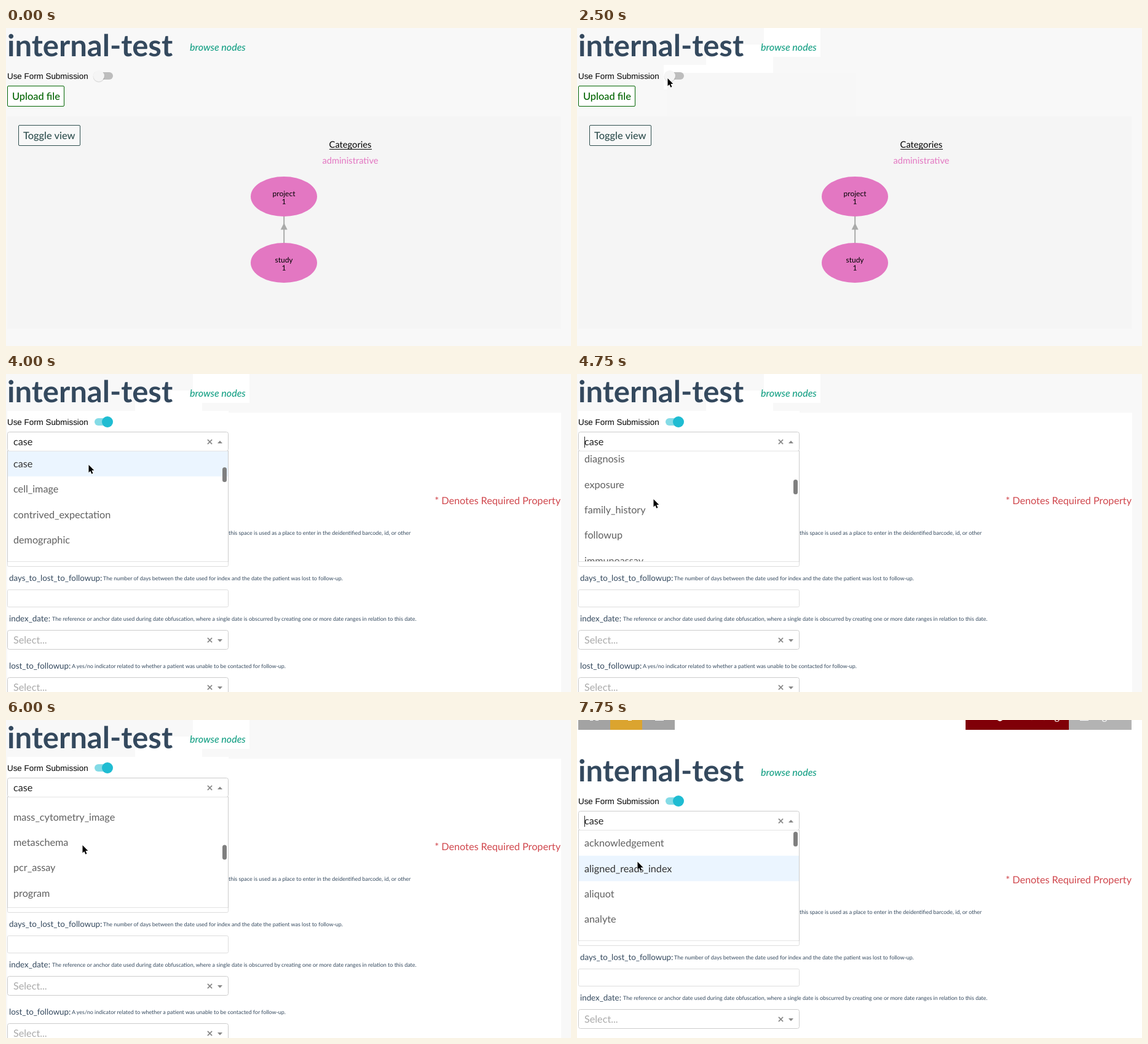
Write an HTML page that moves like this. It is 919 px wide and 518 px high and loops after 8000 ms.

```html
<!DOCTYPE html>
<html lang="en">
<head>
<meta charset="utf-8">
<title>internal-test</title>
<style>
@property --scroll { syntax: "<number>"; inherits: true; initial-value: 0; }
html, body { margin: 0; width: 100%; height: 100%; overflow: hidden; background: #f8f8f8; }
svg { display: block; width: 919px; height: 518px; font: 16.2px Lato, sans-serif; text-rendering: geometricPrecision; }
.title { font-size: 49px; font-weight: 700; fill: #34495e; }
.link { font-size: 16px; font-style: italic; font-weight: 500; fill: #16a085; }
.sans { font: 13.4px "Liberation Sans", Arial, sans-serif; }
.button { font-size: 16.4px; font-weight: 500; }
.node { font-size: 12px; text-anchor: middle; }
.legend { font-size: 14.7px; text-anchor: middle; }
.label { font-size: 13.35px; fill: #34495e; }
.hint { font-size: 8.95px; fill: #34495e; }
.box { fill: #fff; stroke: #ccc; }
.input { fill: #fff; stroke: #ddd; }
.muted { fill: #aaa; }
.option { fill: #606060; }
.lit rect { fill: #ebf5ff; }
.lit text { fill: #333; }
.required { fill: #d0474d; text-anchor: end; }

/* every change is a hard step on a 250 ms grid (3.125%) */
.anim { animation: 8s step-end infinite; }
.trail1 { animation-name: trail1; }
.trail2 { animation-name: trail2; }
.trail3 { animation-name: trail3; }
.press { animation-name: press; }
.form { animation-name: form; }
.graph { animation-name: graph; }
.ripple { animation-name: ripple; }
.menu { animation-name: menu, scroll; }
.rows { transform: translateY(calc(var(--scroll) * -1px)); }
.thumb { transform: translateY(calc(var(--scroll) * .116px)); }
.caret { animation-name: caret; animation-duration: 1s; }
.lit-case { animation-name: lit-case; }
.lit-index { animation-name: lit-index; }
.blank { animation-name: blank; }
.page { animation-name: page; }
.cursor { animation-name: cursor; }

@keyframes trail1 { 0% { opacity: 0 } 9.375%, to { opacity: 1 } }
@keyframes trail2 { 0% { opacity: 0 } 12.5%, to { opacity: 1 } }
@keyframes trail3 { 0% { opacity: 0 } 15.625%, to { opacity: 1 } }
@keyframes press { 0% { opacity: 0 } 31.25%, to { opacity: 1 } }
@keyframes form { 0% { opacity: 0 } 34.375%, to { opacity: 1 } }
@keyframes graph { 0% { opacity: 1 } 34.375%, to { opacity: 0 } }
@keyframes ripple { 0% { opacity: 0 } 34.375% { opacity: .25 } 40.625% { opacity: .12 } 46.875%, to { opacity: 0 } }
@keyframes menu { 0% { opacity: 0 } 46.875%, to { opacity: 1 } }
@keyframes caret { 0% { opacity: 0 } 50%, to { opacity: 1 } }
@keyframes lit-case { 0% { opacity: 0 } 46.875% { opacity: 1 } 56.25%, to { opacity: 0 } }
@keyframes lit-index { 0% { opacity: 0 } 93.75%, to { opacity: 1 } }
@keyframes blank { 0% { opacity: 0 } 90.625%, to { opacity: 1 } }
@keyframes page {
  0% { transform: none }
  90.625% { transform: translateY(18px) }
  93.75% { transform: translateY(46px) }
  96.875%, to { transform: translateY(54px) }
}
@keyframes scroll {
  0% { --scroll: 207 }
  56.25% { --scroll: 290 }
  59.375% { --scroll: 380 }
  62.5% { --scroll: 450 }
  65.625% { --scroll: 520 }
  68.75% { --scroll: 580 }
  71.875% { --scroll: 625 }
  75% { --scroll: 650 }
  78.125% { --scroll: 590 }
  81.25% { --scroll: 440 }
  84.375% { --scroll: 275 }
  87.5% { --scroll: 130 }
  90.625%, to { --scroll: 0 }
}
@keyframes cursor {
  0% { transform: translate(-40px, -40px) }
  6.25% { transform: translate(385px, 0) }
  9.375% { transform: translate(305px, 29px) }
  12.5% { transform: translate(210px, 56px) }
  15.625% { transform: translate(149px, 79px) }
  18.75% { transform: translate(147px, 81px) }
  40.625% { transform: translate(148px, 92px) }
  43.75% { transform: translate(144px, 108px) }
  46.875% { transform: translate(138px, 120px) }
  50% { transform: translate(134px, 147px) }
  53.125% { transform: translate(128px, 180px) }
  56.25% { transform: translate(124px, 203px) }
  93.75% { transform: translate(112px, 218px) }
  96.875%, to { transform: translate(98px, 230px) }
}
</style>
</head>
<body>
<svg viewBox="0 0 919 518">
  <defs>
    <clipPath id="list"><rect x="3" y="126" width="358" height="179"/></clipPath>
    <g id="clear" stroke="#888" stroke-width="1.7"><path d="M-3.6-3.6 3.6 3.6M3.6-3.6-3.6 3.6"/></g>
    <g id="select">
      <rect class="box" x="2.5" y=".5" width="359" height="31" rx="3"/>
      <use href="#clear" x="331.5" y="16.5"/>
    </g>
    <path id="down" d="M344 15h8l-4 4.5z" fill="#888"/>
  </defs>

  <rect width="919" height="518" fill="#f8f8f8"/>
  <g fill="#fff">
    <rect class="anim trail1" x="304" width="92" height="47"/>
    <rect class="anim trail2" x="210" y="27" width="109" height="46"/>
    <rect class="anim trail3" x="141" y="60" width="79" height="40"/>
  </g>
  <rect class="anim press" x="147" y="73" width="306" height="72" fill="#f7f7f7"/>

  <g class="anim graph">
    <rect x="2" y="144" width="900" height="346" fill="#f5f5f5"/>
    <g class="button">
      <rect x="2.5" y="94.5" width="92" height="33" rx="1.5" fill="#fff" stroke="#006400"/>
      <text x="10" y="117" fill="#006400">Upload file</text>
      <rect x="20.5" y="158.5" width="100" height="33" rx="1.5" fill="#f8f8f8" stroke="#2f4f4f"/>
      <text x="28" y="181" fill="#2f4f4f">Toggle view</text>
    </g>
    <g class="legend">
      <text x="560" y="195">Categories</text>
      <path d="M526 197.5h69" stroke="#000"/>
      <text x="560" y="221" fill="#e377c2">administrative</text>
    </g>
    <path d="M452.2 306v45" stroke="#a9aaa9" stroke-width="2"/>
    <path d="M452.2 317.5l5.5 11h-11z" fill="#a9aaa9"/>
    <g fill="#e377c2">
      <ellipse cx="452" cy="274.5" rx="54" ry="32.5"/>
      <ellipse cx="452" cy="382.5" rx="54" ry="32.5"/>
    </g>
    <g class="node">
      <text x="452" y="274">project</text><text x="452" y="286.5">1</text>
      <text x="452" y="382">study</text><text x="452" y="394.5">1</text>
    </g>
  </g>

  <path class="anim form" d="M2 60h360v3h541v455H2z" fill="#fff"/>
  <rect class="anim blank" width="919" height="518" fill="#fff"/>

  <g class="anim page">
    <g class="anim blank">
      <path d="M2-90h52v52H2zM106-90h53v52h-53z" fill="#a3a3a3"/>
      <path d="M54-90h52v52H54z" fill="#dba42f"/>
      <path d="M632-90h168v52H632z" fill="#800008"/>
      <path d="M800-90h102v52H800z" fill="#b3b3b3"/>
      <g fill="#fff">
        <path d="M21-60h5v7h-5zM30-60h5v7h-5zM83-60h6v7h-6zM127-60h14v7h-14zM818-60h14v7h-14z"/>
        <circle cx="688" cy="-57" r="5"/>
        <text x="785" y="-54.5" text-anchor="end">Browsing</text>
        <text x="837" y="-54.5">Login</text>
      </g>
    </g>

    <text class="title" x="2" y="46">internal-test</text>
    <text class="link" x="299" y="37">browse nodes</text>
    <text class="sans" x="2" y="83">Use Form Submission</text>

    <g class="anim graph">
      <rect x="146" y="72" width="28" height="12" rx="6" fill="#bdbdbd"/>
      <circle cx="151" cy="79" r="9.5" fill="#000" opacity=".1"/>
      <circle cx="151" cy="78" r="9" fill="#f5f5f5"/>
    </g>
    <g class="anim form">
      <rect x="144" y="72" width="28" height="12" rx="6" fill="#84dbe6"/>
      <circle class="anim ripple" cx="165" cy="78" r="18" fill="#1fbcd2"/>
      <circle cx="165" cy="78" r="9" fill="#1fbcd2"/>

      <use href="#select" y="94"/>
      <text x="12" y="116" fill="#222">case</text>
      <text class="label" x="5" y="178">Properties:</text>
      <text class="required" x="902" y="212">* Denotes Required Property</text>

      <text class="label" x="5" y="262">submitter_id:</text>
      <text class="hint" x="360" y="262" text-anchor="end">A project-unique identifier for this case, where</text>
      <text class="hint" x="362" y="262">this space is used as a place to enter in the deidentified barcode, id, or other</text>
      <rect class="input" x="2.5" y="284.5" width="359" height="29" rx="2"/>

      <text class="label" x="5" y="336.5">days_to_lost_to_followup:</text>
      <text class="hint" x="158" y="336">The number of days between the date used for index and the date the patient was lost to follow-up.</text>
      <rect class="input" x="2.5" y="351.5" width="359" height="28" rx="2"/>

      <text class="label" x="5" y="402.5">index_date:</text>
      <text class="hint" x="75" y="402">The reference or anchor date used during date obfuscation, where a single date is obscurred by creating one or more date ranges in relation to this date.</text>
      <use href="#select" y="417"/><use href="#down" y="417"/>
      <text class="muted" x="12" y="439">Select...</text>

      <text class="label" x="5" y="479.5">lost_to_followup:</text>
      <text class="hint" x="107" y="479">A yes/no indicator related to whether a patient was unable to be contacted for follow-up.</text>
      <use href="#select" y="494"/><use href="#down" y="494"/>
      <text class="muted" x="12" y="516">Select...</text>
    </g>

    <g class="anim menu">
      <rect x="3" y="126" width="358" height="180" fill="#fff"/>
      <path d="M2.5 125v181M361.5 125v181" stroke="#ccc"/>
      <path d="M3 125.5h358M3 305.5h358" stroke="#e4e4e4"/>
      <path d="M344 113h8l-4-4.5z" fill="#888"/>
      <g clip-path="url(#list)"><g class="rows" id="rows"></g></g>
      <rect class="thumb" x="352" y="128" width="7" height="24" rx="3.5" fill="#7f7f7f"/>
      <path class="anim caret" d="M12.5 102v18" stroke="#222"/>
    </g>
  </g>

  <path class="anim cursor" d="M.5 1V13.6L3.3 10.9 5.4 15.7 7.4 14.8 5.4 10.1H9.3Z" stroke="#fff" paint-order="stroke"/>
</svg>
<script>
const ROW = 41.33;
const names = `acknowledgement aligned_reads_index aliquot analyte biospecimen case cell_image
  contrived_expectation demographic diagnosis exposure family_history followup immunoassay keyword
  mass_cytometry_assay mass_cytometry_image metaschema pcr_assay program project publication root
  sample`.split(/\s+/);
const lit = { case: "lit-case", aligned_reads_index: "lit-index" };

document.getElementById("rows").innerHTML = names.map((name, i) => {
  const y = 125.8 + i * ROW;
  const text = `<text x="12" y="${y + 26.5}">${name}</text>`;
  const glow = lit[name]
    ? `<g class="anim lit ${lit[name]}"><rect x="3" y="${y}" width="358" height="${ROW}"/>${text}</g>`
    : "";
  return `<g class="option">${text}${glow}</g>`;
}).join("");
</script>
</body>
</html>
```
